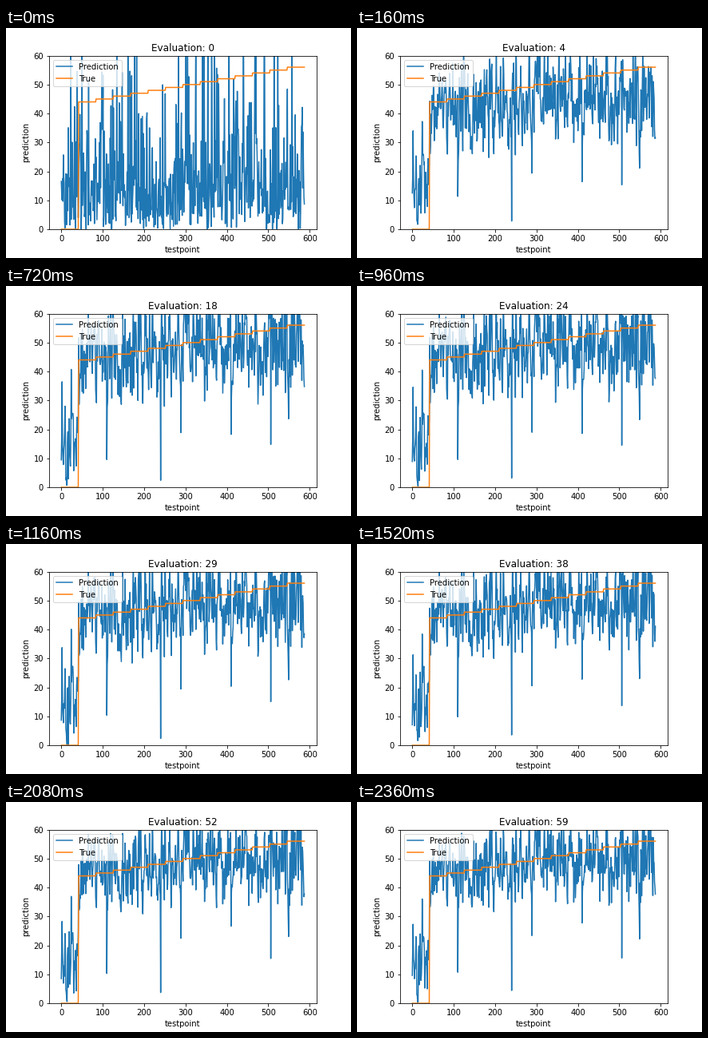
A matplotlib script that plays this animation: 432x288 px, repeating every 2.4 s.

```python
import numpy as np
import matplotlib.pyplot as plt
from matplotlib.animation import FuncAnimation

FRAMES, INTERVAL = 60, 40
STEP, LEVELS = 42, 13
SETTLED = 11  # evaluation after which the noise only shrinks slowly

# Deepest outliers: test point -> value once settled, value at the end
OUTLIERS = {2: (38, 27), 24: (42, 36), 110: (9, 11), 240: (2, 4),
            289: (18, 23), 410: (16, 28), 506: (14, 15)}

rng = np.random.default_rng(7)
true = np.concatenate([np.zeros(STEP), np.repeat(np.arange(44, 44 + LEVELS), STEP)])
count = len(true)
x = np.arange(count)
idle = x < STEP


def lerp(a, b, k):
    return a + (b - a) * k


# Untrained output: skewed noise whose tail leaves the plot
start = rng.gamma(1.5, 15, count) - 1

# Neighbouring test points share part of their error
raw = rng.normal(size=count + 1)
noise = np.clip((raw[1:] + 0.5 * raw[:-1]) / np.hypot(1, 0.5), -2.1, 2.3)
phase = rng.uniform(0, 2 * np.pi, count)
speed = rng.uniform(0.04, 0.16, count)

ramp = (x - STEP) / (count - STEP)
sag = 14 * np.exp(-((x - 551) / 6) ** 2)
mean = np.where(idle, 13, 44 + 9 * ramp - sag)
early_sd = np.where(idle, 8, 8 + 1.5 * ramp)
late_sd = np.where(idle, 6.5, 5.5 + 2.5 * ramp)


def prediction(n):
    k = np.clip((n - SETTLED) / (FRAMES - 1 - SETTLED), 0, 1)
    jitter = np.random.default_rng(100 + n).normal(size=count)
    drift = 0.25 * np.sin(phase + speed * n) + 0.1 * jitter
    y = mean + lerp(early_sd, late_sd, k) * (noise + drift)
    y[idle] = np.abs(y[idle])
    for i, (early, late) in OUTLIERS.items():
        y[i] = lerp(early, late, k) + 0.4 * jitter[i]
    weight = np.exp(-n / 2) if n < SETTLED else 0
    return lerp(y, start, weight)


fig, ax = plt.subplots(figsize=(6, 4), dpi=72)
fig.subplots_adjust(left=0.125, right=0.9, bottom=0.125, top=0.88)
pred_line, = ax.plot(x, prediction(0), label="Prediction")
ax.plot(x, true, label="True")
ax.set_ylim(0, 60)
ax.set_xlabel("testpoint")
ax.set_ylabel("prediction")
ax.legend(loc="upper left")
title = ax.set_title("Evaluation: 0")


def update(n):
    pred_line.set_ydata(prediction(n))
    title.set_text(f"Evaluation: {n}")
    return pred_line, title


anim = FuncAnimation(fig, update, frames=FRAMES, interval=INTERVAL,
                     repeat=True, repeat_delay=0)
plt.show()
```
